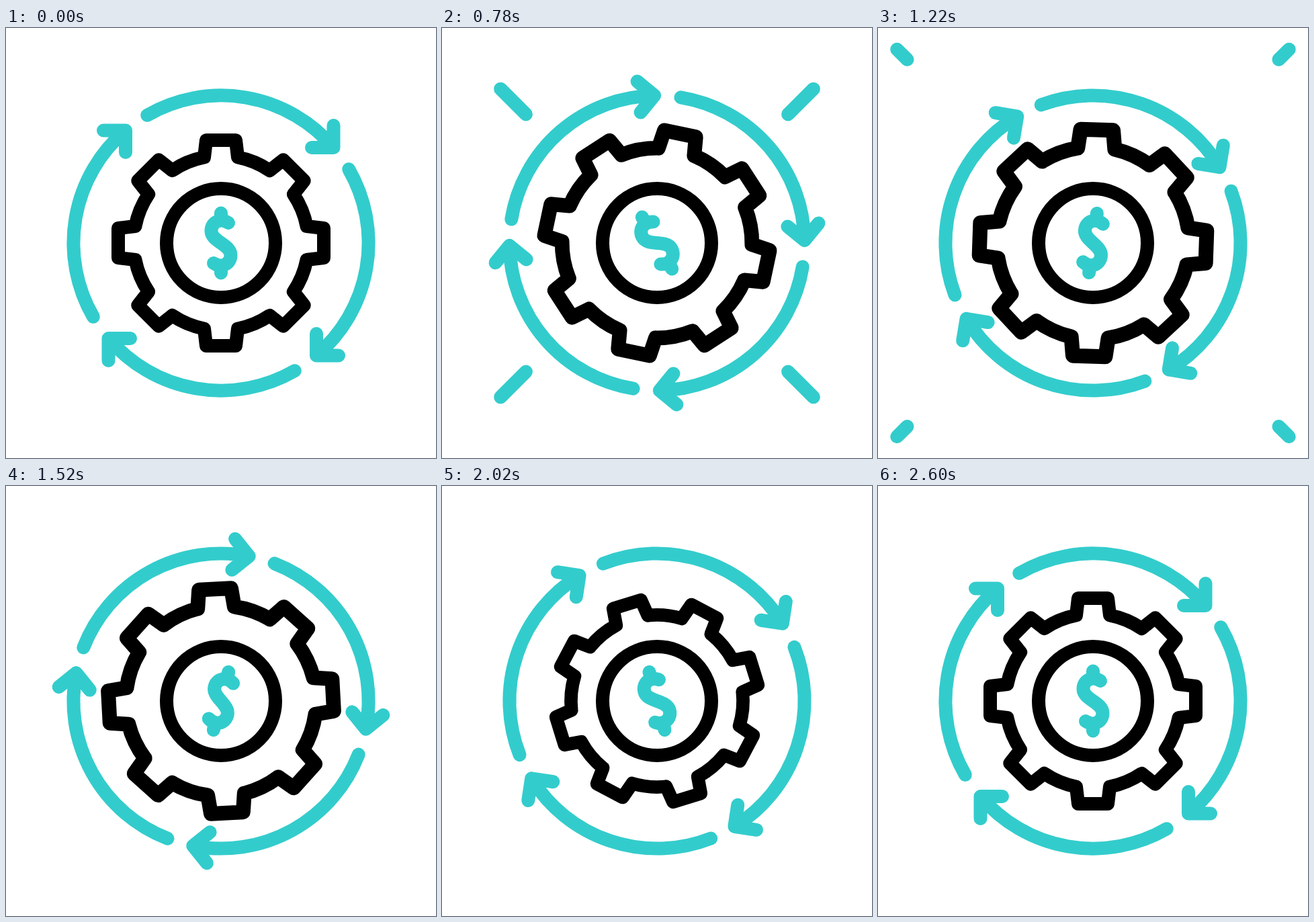
Recreate the animation shown at these times as an HTML page with a canvas. Size 640 by 640 pixels, loop 3000 ms.

```html
<!DOCTYPE html>
<html lang="en">
<head>
<meta charset="utf-8">
<title>Gear cycle</title>
<style>
  html, body { margin: 0; width: 100%; height: 100%; overflow: hidden; background: #fff; }
  canvas { display: block; width: 100vmin; height: 100vmin; }
</style>
</head>
<body>
<canvas width="640" height="640"></canvas>
<script>
const canvas = document.querySelector('canvas');
const ctx = canvas.getContext('2d');
const LOOP = 3000, STEP = 20;
const TEAL = '#33cccc', BLACK = '#000';
const RAD = Math.PI / 180;

// Keyframes as [time, value], eased in and out on every segment.
const tracks = {
  ring: [[200, 0], [2200, 193], [2600, 180]],
  gearTurn: [[200, 0], [1200, 92], [2200, 71], [2600, 90]],
  gearScale: [[200, 1], [1000, 1.107], [1600, 1.09], [2200, 0.956], [2600, 1]],
  dollar: [[200, 0], [800, -30], [1400, 18], [2000, -15], [2600, 0]],
  rayHead: [[385, 194], [1320, 295]],
  rayTail: [[740, 194], [1400, 295]]
};

function valueAt(keys, t) {
  if (t <= keys[0][0]) return keys[0][1];
  for (let i = 1; i < keys.length; i++) {
    const [t0, a] = keys[i - 1], [t1, b] = keys[i];
    if (t < t1) {
      const u = (t - t0) / (t1 - t0);
      return a + (b - a) * u * u * (3 - 2 * u);
    }
  }
  return keys[keys.length - 1][1];
}

function makeGear() {
  const path = new Path2D();
  const half = Math.atan2(25, 127.5);
  for (let i = 0; i < 8; i++) {
    const mid = i * 45 * RAD, c = Math.cos(mid), s = Math.sin(mid);
    const corner = (x, y) => path.lineTo(x * c - y * s, x * s + y * c);
    corner(-25, -127.5);
    corner(-22, -153);
    corner(22, -153);
    corner(25, -127.5);
    const from = mid - Math.PI / 2 + half;
    path.arc(0, 0, 130, from, from + 45 * RAD - 2 * half);
  }
  path.closePath();
  return path;
}

function makeArrow() {
  const path = new Path2D();
  path.arc(0, 0, 219.6, -120 * RAD, Math.atan2(-142, 167.5));
  path.moveTo(167.5, -175);
  path.lineTo(167.5, -142);
  path.lineTo(135, -142);
  return path;
}

const gear = makeGear();
const arrow = makeArrow();
const hub = new Path2D();
hub.arc(0, 0, 81, 0, Math.PI * 2);
const dollar = new Path2D(
  'M11-30C-1-38-14.5-31-14.5-18C-14.5-2 14.5 2 14.5 18C14.5 31 1 38-11 30' +
  'M0-44.5V-34M0 44.5V34');

function drawPath(path, color, degrees = 0, scale = 1) {
  ctx.save();
  ctx.rotate(degrees * RAD);
  ctx.scale(scale, scale);
  ctx.strokeStyle = color;
  ctx.stroke(path);
  ctx.restore();
}

function drawRays(tail, head) {
  if (head - tail < 0.1) return;
  const rays = new Path2D();
  for (const sx of [-1, 1]) {
    for (const sy of [-1, 1]) {
      rays.moveTo(sx * tail, sy * (tail - 3.5));
      rays.lineTo(sx * head, sy * (head - 3.5));
    }
  }
  drawPath(rays, TEAL);
}

function draw(t) {
  const at = name => valueAt(tracks[name], t);
  ctx.setTransform(1, 0, 0, 1, 0, 0);
  ctx.fillStyle = '#fff';
  ctx.fillRect(0, 0, 640, 640);
  ctx.translate(320, 320);
  ctx.lineWidth = 20;
  ctx.lineCap = ctx.lineJoin = 'round';

  drawRays(at('rayTail'), at('rayHead'));
  for (let i = 0; i < 4; i++) drawPath(arrow, TEAL, at('ring') + i * 90);
  drawPath(gear, BLACK, at('gearTurn'), at('gearScale'));
  drawPath(hub, BLACK);
  drawPath(dollar, TEAL, at('dollar'));
}

const start = performance.now();
function tick() {
  const t = (performance.now() - start) % LOOP;
  draw(Math.floor(t / STEP) * STEP);
  requestAnimationFrame(tick);
}
tick();
</script>
</body>
</html>
```
